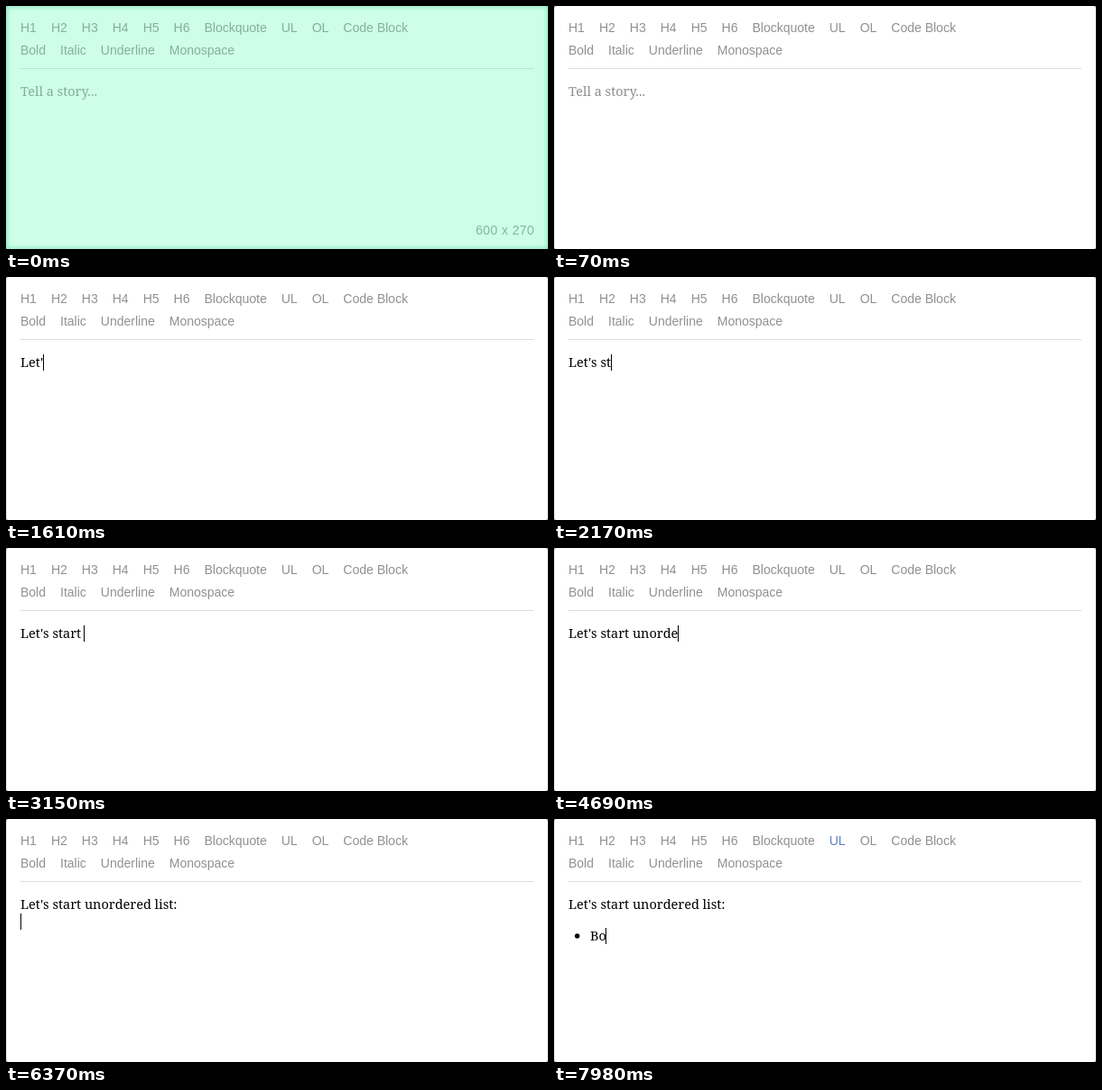
An HTML page for the animation above (8000 ms loop, 600 px wide and 270 px high).

```html
<!DOCTYPE html>
<html lang="en">
<head>
<meta charset="utf-8">
<title>Rich text editor</title>
<style>
  html, body { margin: 0; width: 100%; height: 100%; overflow: hidden; background: #fff; }
  svg { display: block; width: 600px; height: 270px; }
  text { white-space: pre; }
  .toolbar { font: 14px "Liberation Sans", Arial, sans-serif; fill: #909090; }
  .story { font: 14.5px "Noto Serif", Georgia, serif; fill: #000; }
  .size { font: 14px "Liberation Sans", Arial, sans-serif; letter-spacing: .4px; fill: #82b79e; }
</style>
</head>
<body>
<svg viewBox="0 0 600 270">
  <defs>
    <filter id="soft" x="-5%" y="-5%" width="110%" height="110%"><feGaussianBlur stdDeviation="2"/></filter>
  </defs>
  <rect width="600" height="270" fill="#666"/>
  <rect width="600" height="270" rx="2.5" fill="#ddd"/>
  <rect x="1" width="598" height="270" rx="2" fill="#fff"/>
  <g class="toolbar">
    <text x="16" y="29" id="blocks"></text>
    <text x="16" y="54" id="inlines"></text>
  </g>
  <rect x="16" y="69" width="568" height="1" fill="#ddd"/>
  <g class="story">
    <text x="16" y="100" id="placeholder">Tell a story...</text>
    <text x="16" y="100" id="first"></text>
    <text x="16" y="119" id="star">*</text>
    <circle cx="25.7" cy="130" r="2.7" id="bullet"/>
    <text x="40" y="135" id="item"></text>
    <rect width="1" height="18" id="caret"/>
  </g>
  <g id="overlay">
    <rect width="600" height="270" fill="rgb(95,255,172)" fill-opacity=".3"/>
    <rect width="600" height="270" fill="none" stroke="#7fe3bd" stroke-width="3" filter="url(#soft)"/>
    <text class="size" x="585" y="254" text-anchor="end">600 x 270</text>
  </g>
</svg>
<script>
const LOOP = 8000;
const SENTENCE = "Let's start unordered list:";
// One time per typed character
const SENTENCE_KEYS = [
  1190, 1330, 1470, 1610, 1750, 1890, 2030, 2170,
  2800, 2940, 3150, 3150,
  3710, 3710,
  4270, 4410, 4550, 4690, 4830, 4970, 5110, 5110,
  5180, 5320, 5460, 5530, 6090
];
const ITEM = "Bo";
const ITEM_KEYS = [7840, 7980];
const CARET_OFF = [
  [0, 630], [1050, 1190], [2660, 2800], [3570, 3710],
  [4130, 4270], [6020, 6090], [6930, 7070], [7700, 7840]
];
const FOCUS = 630, ENTER = 6370, STAR = 7070, LIST = 7210;

const el = id => document.getElementById(id);
const show = (node, on) => node.setAttribute("visibility", on ? "visible" : "hidden");
const typed = (text, keys, t) => text.slice(0, keys.filter(k => k <= t).length);

function addButtons(row, labels) {
  return labels.map((label, i) => {
    const span = document.createElementNS("http://www.w3.org/2000/svg", "tspan");
    span.textContent = label;
    if (i) span.setAttribute("dx", 16);
    row.append(span);
    return span;
  });
}

const blockButtons = addButtons(el("blocks"),
  ["H1", "H2", "H3", "H4", "H5", "H6", "Blockquote", "UL", "OL", "Code Block"]);
addButtons(el("inlines"), ["Bold", "Italic", "Underline", "Monospace"]);
const listButton = blockButtons[7];

const [placeholder, first, star, bullet, item, caret, overlay] =
  ["placeholder", "first", "star", "bullet", "item", "caret", "overlay"].map(el);

function placeCaret(x, y) {
  caret.setAttribute("x", Math.floor(x));
  caret.setAttribute("y", y);
}

function draw(t) {
  const inList = t >= LIST;
  const starred = t >= STAR && !inList;
  first.textContent = typed(SENTENCE, SENTENCE_KEYS, t);
  item.textContent = typed(ITEM, ITEM_KEYS, t);

  show(overlay, t < 70);
  show(placeholder, t < SENTENCE_KEYS[0]);
  placeholder.style.fill = t < FOCUS ? "#8e8e8e" : "#bdc1c9";
  show(star, starred);
  show(bullet, inList);
  listButton.style.fill = inList ? "#6080c0" : "";

  if (inList) placeCaret(40 + item.getComputedTextLength(), 121);
  else if (t >= ENTER) placeCaret(16 + (starred ? star.getComputedTextLength() : 0), 105);
  else placeCaret(16 + first.getComputedTextLength(), 86);
  show(caret, !CARET_OFF.some(([from, to]) => t >= from && t < to));
}

const start = performance.now();
function tick() {
  draw((performance.now() - start) % LOOP);
  requestAnimationFrame(tick);
}
tick();
</script>
</body>
</html>
```
